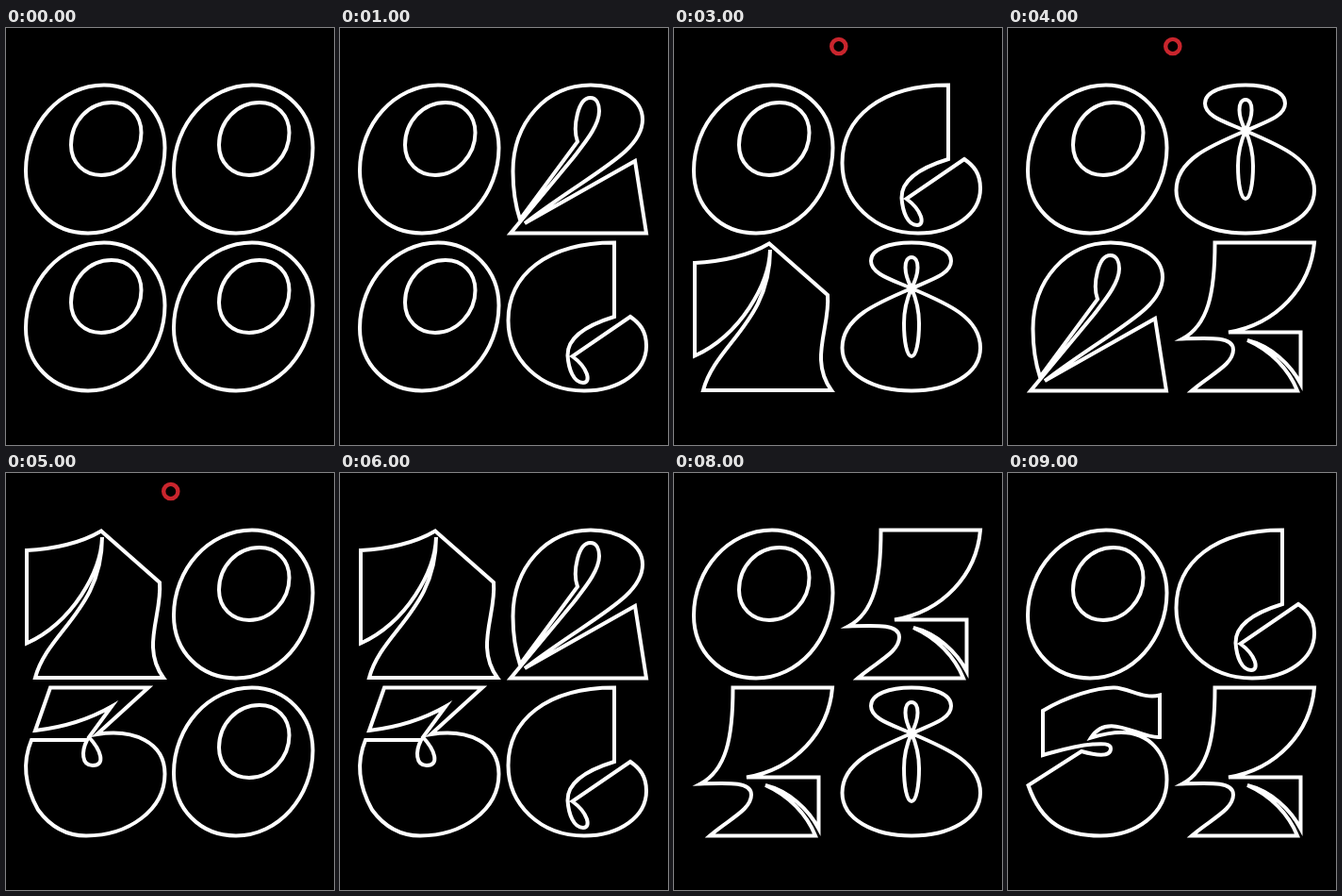
An HTML page without scripts that plays this animation: 348x442 px, repeating every 10 s.

```html
<!DOCTYPE html>
<html lang="en">
<head>
<meta charset="utf-8">
<title>Outline clock</title>
<style>
  html, body { margin: 0; width: 100%; height: 100%; overflow: hidden; background: #000; }
  svg { display: block; width: 100%; height: 100%; }
  .digits { fill: none; stroke: #fff; stroke-width: 4; stroke-miterlimit: 10; }
  /* each time is shown for one tenth of the loop */
  .time { visibility: hidden; animation: tick 10s step-end calc((var(--i) - 10) * 1s) infinite; }
  @keyframes tick { 0% { visibility: visible; } 10%, 100% { visibility: hidden; } }
  .dot { fill: none; stroke: #c9252d; stroke-width: 4.4; visibility: hidden; animation: dot 10s step-end infinite; }
  @keyframes dot { 0% { visibility: hidden; } 20% { visibility: visible; } 60%, 100% { visibility: hidden; } }
</style>
</head>
<body>
<svg viewBox="0 0 348 442">
  <defs>
    <path id="d0" d="M104 60.5C140 60.5 168.5 90 168.5 127C168.5 176 132 217.5 87 217.5C49 217.5 21 189 21 151C21 102 58 60.5 104 60.5Z
      M112 79C130 79 143.5 92 143.5 111C143.5 135 124 156 101 156C83 156 69 143 69 124C69 99 88 79 112 79Z"/>
    <path id="d1" d="M22 82C50 81 80 74 101 61.5L163 116C166 150 143 184 167 217H31C44 168 102 145 102 68C101 104 71 158 22 180.5Z"/>
    <path id="d2" d="M24 217.5H168L156 141L39 207C110 153 164 132 164 97C164 76 140 60.5 109 60.5C62 60.5 26.5 100 26.5 152C26.5 168 28 185 34 203
      L95 120.5C89.500 105 95.500 74 108.500 74C115.500 74 118 81 118 88C118 104 101.500 123 90.500 137.500Z"/>
    <path id="d3" d="M47 60.5H151L96.500 110C135 104 168.5 118 168.5 152C168.5 190 130 217.5 85 217.5C62 217.5 45 205 34 190C20 165 17 140 27 116
      H86C80 128 80 143 92 143C106 143 101 127 88 113L112 80.500C92 92 65 102 31 106Z"/>
    <path id="d4" d="M62.5 60.5H168C164 108 128 147 77 155.500H153.500V210C143 190 122 170 97 164C122 175 141 195 150 217.5H38
      C58 200 82 190 82 174C82 160 58 161.5 28 162.500C55 148 62.5 115 62.5 60.5Z"/>
    <path id="d5" d="M37 85C62 70 95 60 113 60.5C128 61 144 73 161 68.500V113C140 115 106 85 88 113.500C100 110 112 108 120 108
      C150 108 168.5 130 168.5 158C168.5 195 135 217.5 98 217.5C62 217.5 36 206 21.5 164L78 128
      C92 132 109 135 109 125C109 119 98 120 90 120.5C70 122 55 127 37 132Z"/>
    <path id="d6" d="M134 60.5V139C108 147 84 160 84.500 180C85.500 195 91 209 101 209C110 209 106 193 89.500 181L151 139
      C161 146 168 154 168 170C168 197 140 217.5 102 217.5C55 217.5 21.5 184 21.5 143C21.5 95 62 60.5 134 60.5Z"/>
    <path id="d8" d="M95 109C75 100 52 94 52 80C52 67 72 60.5 95 60.5S137 67 137 80C137 94 115 100 95 109
      C133 125 168 140 168 172C168 200 135 217.5 95 217.5S21.5 200 21.5 172C21.5 140 57 125 95 109Z
      M95 109C90 99 88.5 92 88.5 87C88.5 80 91 76 95 76S101.5 80 101.5 87C101.5 92 100 99 95 109
      C100 120 103 134 103 146C103 165 100 181 95 181S87 165 87 146C87 134 90 120 95 109Z"/>
  </defs>

  <circle class="dot" cx="174.8" cy="19.5" r="7.6"/>

  <g class="digits">
    <g class="time" style="--i:0"><use href="#d0"/><use href="#d0" x="157"/><use href="#d0" y="167"/><use href="#d0" x="157" y="167"/></g>
    <g class="time" style="--i:1"><use href="#d0"/><use href="#d2" x="157"/><use href="#d0" y="167"/><use href="#d6" x="157" y="167"/></g>
    <g class="time" style="--i:2"><use href="#d0"/><use href="#d4" x="157"/><use href="#d1" y="167"/><use href="#d2" x="157" y="167"/></g>
    <g class="time" style="--i:3"><use href="#d0"/><use href="#d6" x="157"/><use href="#d1" y="167"/><use href="#d8" x="157" y="167"/></g>
    <g class="time" style="--i:4"><use href="#d0"/><use href="#d8" x="157"/><use href="#d2" y="167"/><use href="#d4" x="157" y="167"/></g>
    <g class="time" style="--i:5"><use href="#d1"/><use href="#d0" x="157"/><use href="#d3" y="167"/><use href="#d0" x="157" y="167"/></g>
    <g class="time" style="--i:6"><use href="#d1"/><use href="#d2" x="157"/><use href="#d3" y="167"/><use href="#d6" x="157" y="167"/></g>
    <g class="time" style="--i:7"><use href="#d0"/><use href="#d2" x="157"/><use href="#d4" y="167"/><use href="#d2" x="157" y="167"/></g>
    <g class="time" style="--i:8"><use href="#d0"/><use href="#d4" x="157"/><use href="#d4" y="167"/><use href="#d8" x="157" y="167"/></g>
    <g class="time" style="--i:9"><use href="#d0"/><use href="#d6" x="157"/><use href="#d5" y="167"/><use href="#d4" x="157" y="167"/></g>
  </g>
</svg>
</body>
</html>
```
